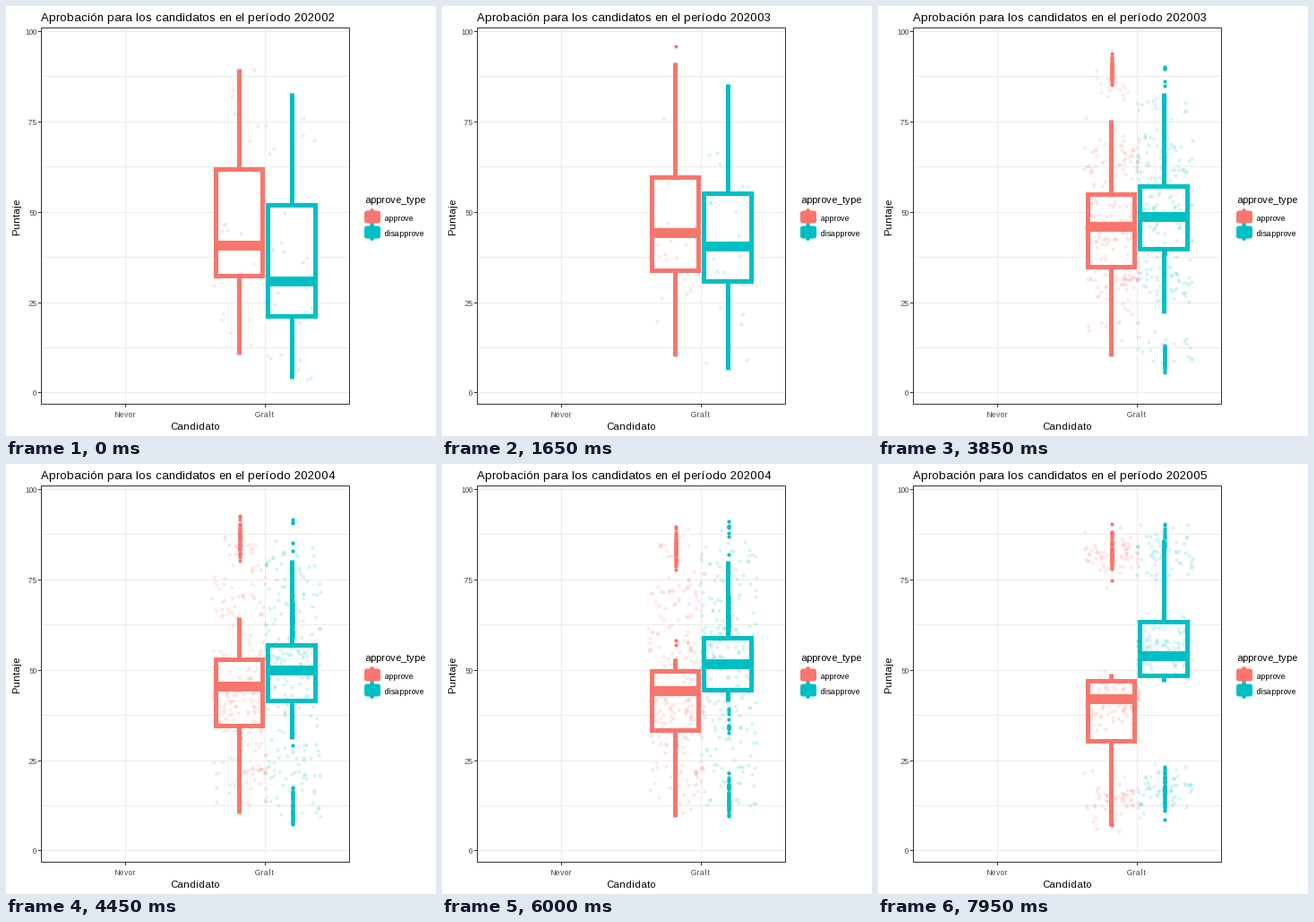
Animation of 480 by 480 pixels, one loop 8000 ms. Source, as a matplotlib script:

```python
import matplotlib.pyplot as plt
import numpy as np
from matplotlib.animation import FuncAnimation
from matplotlib.patches import Rectangle

PX = 0.75  # points per pixel at 96 dpi
FRAMES, STEP = 160, 50
RED, TEAL = "#F8766D", "#00BFC4"
DARK, GRID, GREY = "#333333", "#EBEBEB", "#4D4D4D"
plt.rcParams.update({"font.family": "Liberation Sans", "path.snap": False,
                     "text.hinting_factor": 1, "text.kerning_factor": 6})
rng = np.random.default_rng(12)

PERIODS = ["202002", "202003", "202004", "202005", "202005"]
# (last held frame, arrival frame) of every transition
MOVES = [(7, 50), (58, 100), (108, 150), (158, 200)]


def snap(p):
    """Centre of the pixel that holds p."""
    return np.floor(p) + 0.5


def ypix(v):
    return snap(431.9 - 4.034 * np.asarray(v, float))


def mix(a, b, t):
    return (1 - t) * a + t * b


def bell(n, lo, hi):
    """Bell-shaped sample that spans exactly lo to hi."""
    z = rng.normal(size=n)
    return lo + (hi - lo) * (z - z.min()) / np.ptp(z)


class Poll:
    """One month: five box values and three clusters of scores."""

    def __init__(self, n, box, low, top):
        self.box = np.array(box)
        lo, _, med, _, hi = box
        mid = max(lo, med - 11), min(hi, med + 11)
        k = int(0.27 * n)
        scores = np.concatenate([bell(k, *low), bell(n - 2 * k, *mid), bell(k, *top)])
        self.scores = rng.permutation(scores)

    def outliers(self):
        lo, hi = self.box[[0, -1]]
        return self.scores[(self.scores < lo - 0.01) | (self.scores > hi + 0.01)]


def tween_outliers(a, b, t):
    a, b = a.outliers(), b.outliers()
    if t == 0:
        return a
    if not len(a):  # only a far upper one shows before arrival
        return np.sort(b[b > 90])[-1:]
    n = max(len(a), len(b))
    return mix(np.resize(a, n), np.resize(b, n), t)


class Group:
    def __init__(self, ax, color, x, z, n, months):
        self.polls = [Poll(28 if i == 0 else n, *m)
                      for i, m in enumerate(months + months[-1:])]
        self.jitter = snap(rng.uniform(x - 31, x + 31, n))
        self.x = snap(x)
        self.left, self.right = snap(x - 26.4), snap(x + 26.4)
        line = dict(color=color, solid_capstyle="butt", zorder=z)
        self.dots, = ax.plot([], [], "o", ms=4.2 * PX, mfc=color, mec="none", zorder=z)
        self.whisk, = ax.plot([], [], lw=5 * PX, **line)
        self.box = Rectangle((self.left, 0), self.right - self.left, 1, fc="white",
                             ec=color, lw=5 * PX, joinstyle="miter", zorder=z)
        ax.add_patch(self.box)
        self.mid, = ax.plot([], [], lw=11 * PX, **line)
        self.mid.set_zorder(z + 0.1)
        self.cloud, = ax.plot([], [], "o", ms=3.2 * PX, mfc=(color, 0.1),
                              mec=(color, 0.14), mew=PX, zorder=6)

    def show(self, k, t):
        a, b = self.polls[k:k + 2]
        lo, q1, med, q3, hi = ypix(mix(a.box, b.box, t))
        self.whisk.set_data([self.x] * 5, [lo, q1, np.nan, q3, hi])
        self.box.set_y(q3)
        self.box.set_height(q1 - q3)
        self.mid.set_data([self.left, self.right], [med, med])
        out = tween_outliers(a, b, t)
        self.dots.set_data(np.full(len(out), self.x), ypix(out))
        # scores without a partner wait for the arrival
        n = min(len(a.scores), len(b.scores))
        y = mix(a.scores[:n], b.scores[:n], t) if t else a.scores
        self.cloud.set_data(self.jitter[:len(y)], ypix(y))


fig = plt.figure(figsize=(5, 5), dpi=96, facecolor="white")
ax = fig.add_axes([0, 0, 1, 1])
ax.set(xlim=(0, 480), ylim=(480, 0))
ax.axis("off")


def stroke(xs, ys, color):
    ax.plot(xs, ys, color=color, lw=PX, zorder=1, solid_capstyle="butt")


def label(x, y, s, size, color="black", **kw):
    return ax.text(x, y, s, fontsize=size * PX, color=color, va="baseline", **kw)


for v in np.arange(0, 101, 12.5):
    y = ypix(v)
    stroke([39, 384], [y, y], GRID)
    if v % 25 == 0:
        stroke([36, 39], [y, y], DARK)
        label(34, y + 3.5, f"{v:.0f}", 9, GREY, ha="right")
for x, name in [(133.5, "Nevor"), (289.5, "Gralt")]:
    stroke([x, x], [24, 445], GRID)
    stroke([x, x], [445, 448], DARK)
    label(x - 0.5, 459, name, 9, GREY, ha="center")
ax.add_patch(Rectangle((39.5, 24.5), 344, 420, fill=False, ec=DARK, lw=PX, zorder=8))

label(211, 473, "Candidato", 11, ha="center")
label(15, 235.5, "Puntaje", 11, ha="center", rotation=90, rotation_mode="anchor")
title = label(39, 17, "", 13)

label(400, 220, "approve_type", 11)
for y, name, color in [(235.5, "approve", RED), (252.5, "disapprove", TEAL)]:
    ax.add_patch(Rectangle((402.5, y - 4.5), 13, 9, fc=color, ec=color,
                           lw=5 * PX, joinstyle="round"))
    ax.plot([408.5, 408.5], [y - 7, y + 7], color=color, lw=5 * PX,
            solid_capstyle="round")
    label(423, y + 4.5, name, 9)

# per month: box values, range of the low cluster, range of the top cluster
groups = [
    Group(ax, RED, 260.55, 3, 235, [
        ((10.4, 32.3, 40.8, 61.8, 89.5), (10.4, 25), (70, 89.5)),
        ((9.6, 34.8, 46.6, 58.1, 92.4), (9.8, 33), (75, 96)),
        ((10.4, 34.6, 45, 50.9, 54.8), (5.1, 24), (75.8, 92.4)),
        ((6.7, 30.3, 42, 47, 49), (5.3, 22), (74.6, 90.7))]),
    Group(ax, TEAL, 319.3, 4, 215, [
        ((3.9, 21.2, 30.8, 51.9, 82.8), (3.9, 16), (50, 82.8)),
        ((7.7, 37, 46.9, 57.1, 87), (3, 17), (64, 88.2)),
        ((38.9, 43, 50.9, 56.9, 78), (7.5, 21.7), (72, 94.2)),
        ((46.8, 48.4, 53.9, 63.3, 86), (8.8, 22.8), (75, 92.2))]),
]


def update(i):
    k = next(n for n, (_, end) in enumerate(MOVES) if i < end)
    start, end = MOVES[k]
    t = max(0, (i - start) / (end - start))
    for g in groups:
        g.show(k, t)
    period = PERIODS[k + (t >= 0.5)]
    title.set_text(f"Aprobación para los candidatos en el período {period}")
    return []


anim = FuncAnimation(fig, update, frames=FRAMES, interval=STEP,
                     repeat=True, repeat_delay=0, blit=False)
plt.show()
```
